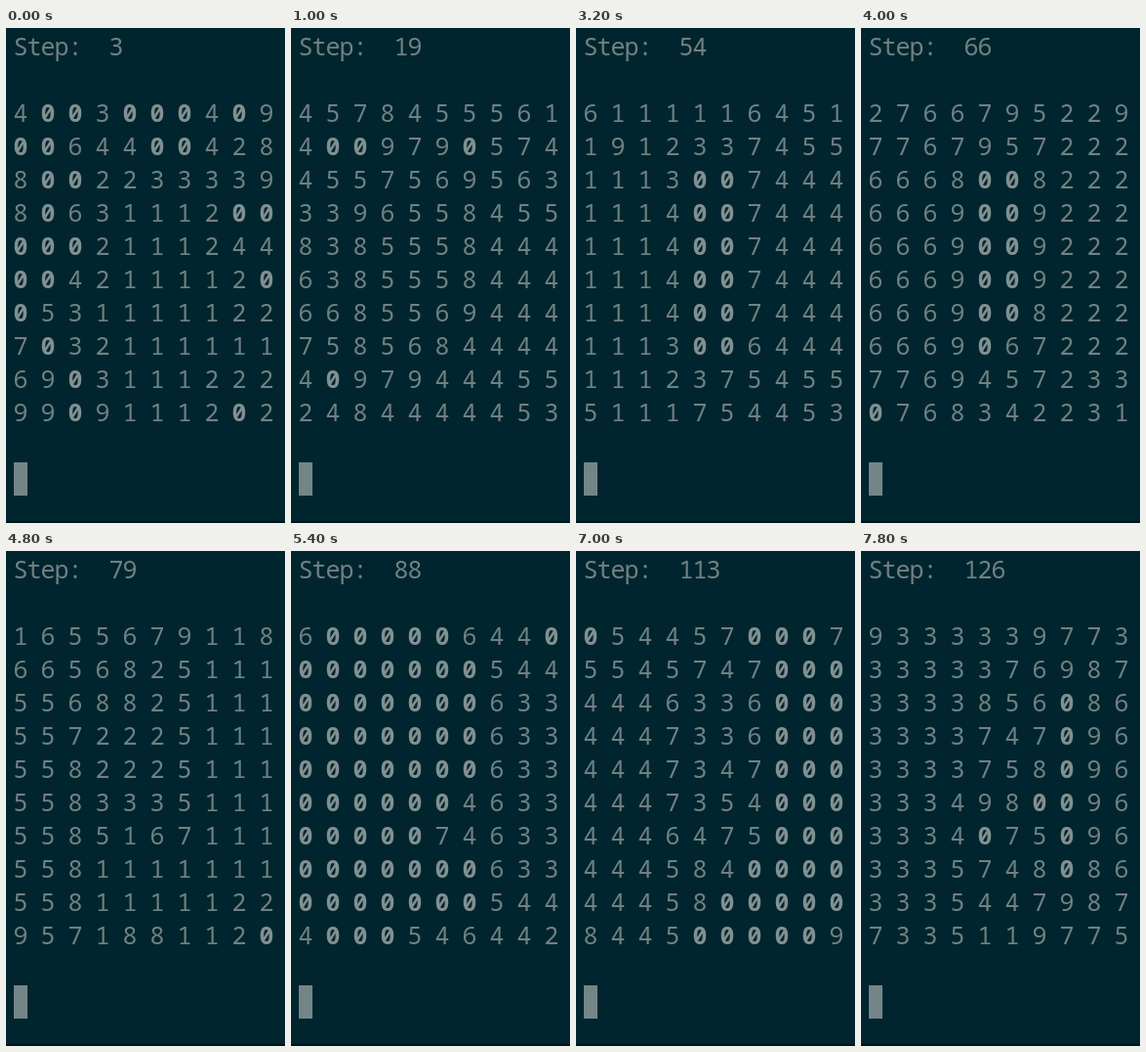
Write an HTML page that moves like this. It is 286 by 506 pixels and loops after 8 s.

```html
<!DOCTYPE html>
<html lang="en">
<head>
<meta charset="utf-8">
<title>Step counter grid</title>
<style>
  html, body { margin: 0; width: 100%; height: 100%; overflow: hidden; background: #00252e; }
  svg { display: block; width: 100%; height: 100%; }
  text {
    font: 400 25px "Noto Sans Mono", "DejaVu Sans Mono", monospace;
    fill: #708183;
    text-anchor: middle;
  }
  text.flash { font-weight: 700; fill: #819090; }
</style>
</head>
<body>
<svg id="stage" viewBox="0 0 286 506" preserveAspectRatio="none">
  <rect width="286" height="506" fill="#00252e"/>
  <rect y="504" width="286" height="2" fill="#00131a"/>
  <rect x="8" y="444" width="14" height="34" fill="#748587"/>
</svg>
<script>
const SIZE = 10, CELL_W = 14, LINE_H = 34;
const LOOP = 8000, TICK = 200, FIRST = 3, RATE = 3.15, PHASE = 0.65;
const START = `
4003000409
0064400428
8002233339
8063111200
0002111244
0042111120
0531111122
7032111111
6903111222
9909111202`;

const stage = document.getElementById("stage");

function addChar(col, row, char = "") {
  const el = document.createElementNS("http://www.w3.org/2000/svg", "text");
  el.setAttribute("x", 15 + col * CELL_W);
  el.setAttribute("y", 28 + row * LINE_H);
  el.textContent = char;
  stage.append(el);
  return el;
}

// Every cell gains one; a cell passing nine flashes, feeds its neighbours and resets.
function advance(grid) {
  const next = grid.map(v => v + 1);
  const queue = [...next.keys()].filter(i => next[i] > 9);
  for (const i of queue) {
    const x = i % SIZE, y = Math.floor(i / SIZE);
    for (let ny = Math.max(0, y - 1); ny <= Math.min(SIZE - 1, y + 1); ny++) {
      for (let nx = Math.max(0, x - 1); nx <= Math.min(SIZE - 1, x + 1); nx++) {
        const n = ny * SIZE + nx;
        if (n !== i && ++next[n] === 10) queue.push(n);
      }
    }
  }
  return next.map(v => v > 9 ? 0 : v);
}

const stepAt = tick => FIRST + Math.floor(tick * RATE + PHASE);

const grids = [START.replace(/\s/g, "").split("").map(Number)];
while (grids.length <= stepAt(LOOP / TICK) - FIRST) grids.push(advance(grids.at(-1)));

[..."Step:"].forEach((char, col) => addChar(col, 0, char));
const counter = [7, 8, 9].map(col => addChar(col, 0));
const cells = grids[0].map((_, i) => addChar(i % SIZE * 2, 2 + Math.floor(i / SIZE)));

let shown = -1;
function draw(time) {
  const step = stepAt(Math.floor(time % LOOP / TICK));
  if (step === shown) return;
  shown = step;
  const label = String(step);
  counter.forEach((el, i) => { el.textContent = label[i] || ""; });
  grids[step - FIRST].forEach((value, i) => {
    cells[i].textContent = value;
    cells[i].classList.toggle("flash", value === 0);
  });
}

const origin = performance.now();
function loop() {
  draw(performance.now() - origin);
  requestAnimationFrame(loop);
}
loop();
</script>
</body>
</html>
```
